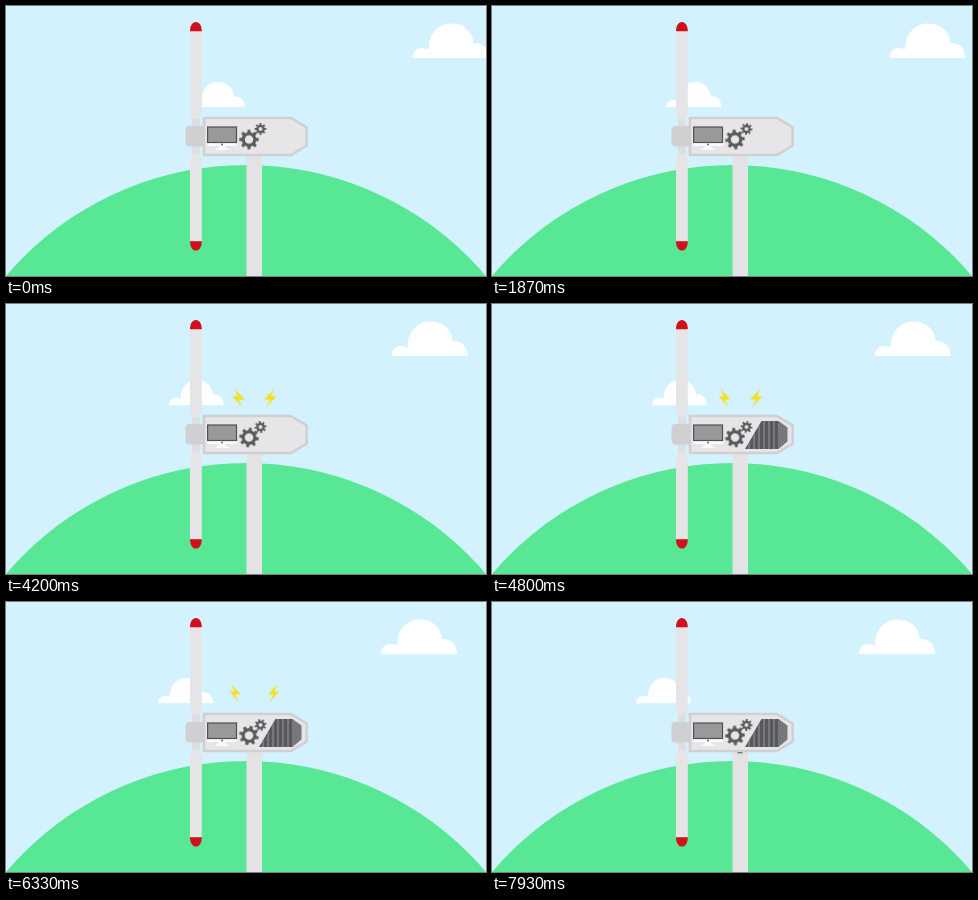
An HTML page for the animation above (8000 ms loop, 480x270 px).

```html
<!DOCTYPE html>
<html lang="en">
<head>
<meta charset="utf-8">
<title>Wind turbine</title>
<style>
  html, body { margin: 0; width: 100%; height: 100%; overflow: hidden; background: #d3f2fd; }
  svg { display: block; width: 100vw; height: 100vh; }
</style>
</head>
<body>
<svg viewBox="0 0 480 270">
  <defs>
    <path id="cloud" d="M0 0C0-7 4-10 10-10C11-10 13-9.500 16-8.500C16-24 25-34.500 39-34.500C52-34.500 60-26 61-14.500C70-16 76-9 76 0Z" fill="#fff"/>
    <path id="blade" d="M184 25H195.800V107L193.500 113H186.300L184 107Z" fill="#e5e4e7"/>
    <path id="tip" d="M184 25.300C184 19.500 186.500 16 189.900 16S195.800 19.500 195.800 25.300Z" fill="#d0111b"/>
    <path id="bolt" d="M4-10L-6 1L0 1.500L-5 10L6-2L1-2.500Z" fill="#f3df25"/>
    <clipPath id="coil"><path d="M269.500 117H287V145H253Z"/></clipPath>
  </defs>

  <rect width="480" height="270" fill="#d3f2fd"/>
  <g id="clouds">
    <use href="#cloud" transform="translate(406.700 52)"/>
    <use href="#cloud" transform="translate(184 101) scale(.72)"/>
  </g>
  <circle cx="240" cy="474" r="315" fill="#58e895"/>

  <rect x="240.500" y="149" width="15.500" height="121" fill="#e3e2e5"/>
  <rect id="cable" x="245.500" y="146" width="5" height="3" fill="#58595b"/>

  <rect x="186" y="111" width="7.800" height="39" fill="#dedde0"/>
  <g id="rotor">
    <use href="#blade"/><use href="#tip"/>
    <g transform="matrix(1 0 0 -1 0 260.500)"><use href="#blade"/><use href="#tip"/></g>
  </g>
  <path d="M198 120H183.500Q179.500 120 179.500 124V136.500Q179.500 140.500 183.500 140.500H198Z" fill="#d0d0d3"/>
  <path d="M198 112H285L300.700 121.500V139.500L285 149H198Z" fill="#e7e5e8" stroke="#d0d0d3" stroke-width="2.600"/>

  <g id="monitor">
    <path d="M201 136H231V138.500Q231 140 229.500 140H202.500Q201 140 201 138.500ZM213 140H219L220 142.500H223V144H209.500V142.500H212Z" fill="#fafafa"/>
    <rect x="201.600" y="121" width="28.900" height="15.500" fill="#98999b" stroke="#505153" stroke-width="1.200"/>
    <circle cx="216" cy="138.500" r=".9" fill="#58595b"/>
  </g>

  <g id="generator" opacity="0">
    <path d="M269.500 117H287V145H253Z" fill="#58595b"/>
    <g id="stripes" clip-path="url(#coil)" stroke="#929396" stroke-width="1.100"></g>
    <path d="M286.500 117L295.500 123.500V137.500L286.500 145Z" fill="#77787b"/>
  </g>

  <g id="gears" fill="#58595b" fill-rule="evenodd"></g>
  <g id="bolts"></g>
</svg>
<script>
  const LOOP = 8000;
  const $ = id => document.getElementById(id);

  function add(parent, name, attrs) {
    const node = document.createElementNS("http://www.w3.org/2000/svg", name);
    for (const key in attrs) node.setAttribute(key, attrs[key]);
    return parent.appendChild(node);
  }

  // steps: [time in ms, style]
  function play(node, steps) {
    node.animate(steps.map(([time, style]) => ({ offset: time / LOOP, ...style })),
      { duration: LOOP, iterations: Infinity });
  }

  const move = (x, y, scale = 1) => `translate(${x}px, ${y}px) scale(${scale})`;

  function gearPath(outer, root, hole, teeth = 8) {
    const points = [];
    for (let i = 0; i < teeth; i++) {
      for (const [shift, radius] of [[-.3, root], [-.18, outer], [.18, outer], [.3, root]]) {
        const angle = (i + shift) / teeth * 2 * Math.PI;
        points.push(`${(radius * Math.cos(angle)).toFixed(2)} ${(radius * Math.sin(angle)).toFixed(2)}`);
      }
    }
    return `M${points.join("L")}ZM${hole} 0A${hole} ${hole} 0 1 0 ${-hole} 0A${hole} ${hole} 0 1 0 ${hole} 0Z`;
  }

  function addGear(x, y, outer, root, hole, turn) {
    const holder = add($("gears"), "g", { transform: `translate(${x} ${y})` });
    const gear = add(holder, "path", { d: gearPath(outer, root, hole) });
    play(gear, [[0, { transform: "rotate(0deg)" }], [LOOP, { transform: `rotate(${turn}deg)` }]]);
  }

  addGear(243, 133.500, 9.800, 7.300, 4.300, 360);
  addGear(254.500, 123, 6, 4.200, 1.900, -360);

  for (let x = 257; x < 288; x += 5) {
    add($("stripes"), "path", { d: `M${x} 117V145` });
  }

  // The two bolts mirror each other around the tower.
  for (const side of [1, -1]) {
    const holder = add($("bolts"), "g", { transform: `translate(248.400 0) scale(${side} 1)` });
    const bolt = add(holder, "use", { href: "#bolt" });
    const start = { transform: move(13, 103, .4), opacity: 0 };
    const near = { transform: move(15.800, 94.500), opacity: 1 };
    const far = { transform: move(19.200, 91.500, .92), opacity: 1 };
    const gone = { transform: move(20.500, 90, .8), opacity: 0 };
    play(bolt, [[0, start], [3400, start], [3700, near], [5200, near],
      [6000, far], [6700, far], [7000, gone], [LOOP, gone]]);
  }

  play($("clouds"), [[0, { transform: move(0, 0) }], [LOOP, { transform: move(-40, 0) }]]);
  play($("generator"), [[0, { opacity: 0 }], [4300, { opacity: 0 }], [4650, { opacity: 1 }], [LOOP, { opacity: 1 }]]);
  play($("cable"), [[0, { transform: move(0, 0) }], [7800, { transform: move(0, 0) }], [LOOP, { transform: move(0, 3.500) }]]);
</script>
</body>
</html>
```
